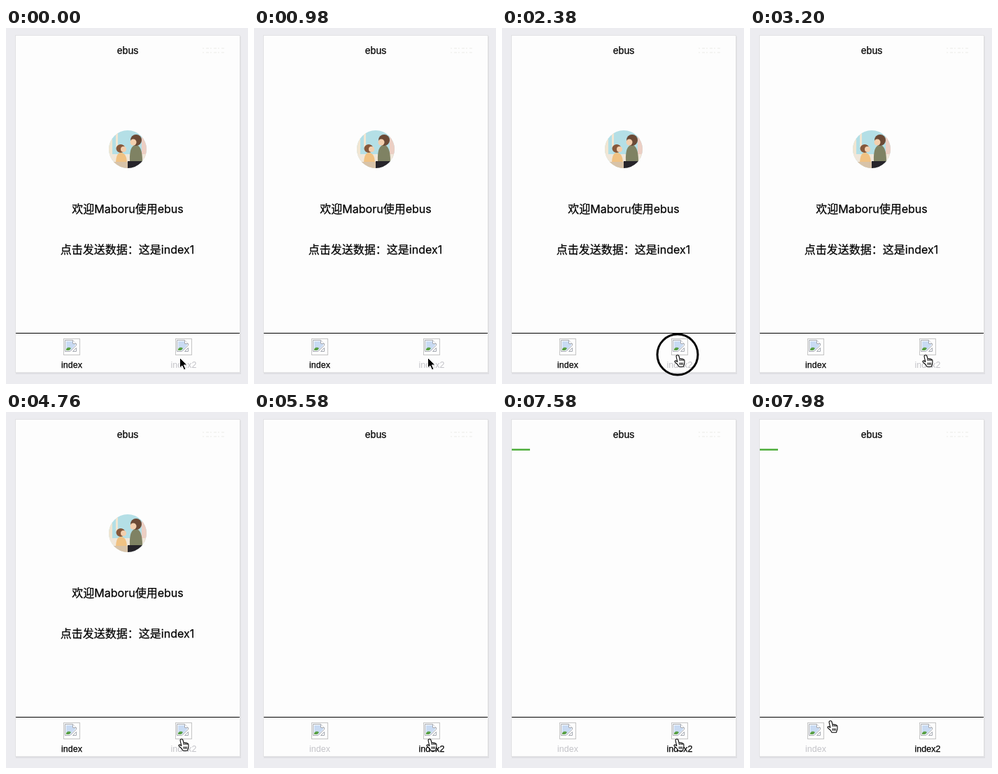
An HTML page for the animation above (8 s loop, 346 px wide and 508 px high).

```html
<!DOCTYPE html>
<html lang="zh-CN">
<head>
<meta charset="utf-8">
<title>ebus</title>
<style>
  html, body { margin: 0; width: 100%; height: 100%; overflow: hidden; background: #ececf0; }
  svg { display: block; width: 100%; height: 100%; }
  text { text-anchor: middle; }
  .ui { font: 14px "Liberation Sans", Arial, sans-serif; }
  .tab { font-size: 12.5px; }
  .msg { font: 16px Inter, "Noto Sans CJK SC", "Noto Sans CJK", sans-serif; }
  .dark { fill: #000; stroke: #000; stroke-width: .25px; }
  .pale { fill: #c3c3c8; }
</style>
</head>
<body>
<svg viewBox="0 0 346 508">
  <defs>
    <clipPath id="round"><circle cx="174" cy="173" r="27"/></clipPath>
    <g id="broken">
      <rect x=".5" y=".5" width="23" height="23" fill="#fdfdfd" stroke="#c4c4c4"/>
      <path d="M2.500 18.500V2.500H13.500L18.500 7.500V10L9.500 18.500Z" fill="#fff" stroke="#a4a8b0"/>
      <path d="M4 4H13V8H17V10L10 17H4Z" fill="#c9dbf3"/>
      <path d="M4 17V15Q7 11 11 14L8.500 17Z" fill="#5aa046"/>
      <path d="M13.500 2.500V7.500H18.500" fill="#fff" stroke="#a4a8b0"/>
      <path d="M18.500 13.500V18.500H13.500Z" fill="#fff" stroke="#a4a8b0"/>
    </g>
  </defs>

  <rect x="14" y="12" width="322" height="482" fill="#dfdfe3"/>
  <rect x="13.500" y="10.500" width="321" height="481" fill="#fdfdfd" stroke="#e2e2e4"/>

  <text class="ui dark" x="174" y="37">ebus</text>
  <path d="M281 29H314M281 35H314" stroke="#f4f4f2" stroke-width="2" stroke-dasharray="2 3 4 2"/>

  <g id="home">
    <g clip-path="url(#round)">
      <rect x="147" y="146" width="54" height="54" fill="#b4dfe6"/>
      <path d="M147 146H152V186H147ZM157 146H160V170H157Z" fill="#f1e6d2"/>
      <path d="M194 146H201V186H194Z" fill="#eccfc4"/>
      <path d="M147 180H201V200H147Z" fill="#f0e7da"/>
      <path d="M157 194Q157 177 165 178Q173 179 173 194Z" fill="#f0c283"/>
      <ellipse cx="164" cy="172" rx="6.500" ry="6" fill="#87583a"/>
      <circle cx="168" cy="173" r="4" fill="#f3cfae"/>
      <path d="M177 190Q176 167 186 167Q195 168 195 190Z" fill="#7f8263"/>
      <circle cx="186" cy="160" r="8" fill="#6b4a36"/>
      <circle cx="182" cy="163" r="4.500" fill="#f3cfae"/>
      <path d="M147 191H174V200H147Z" fill="#d8c3a8"/>
      <path d="M174 190H201V200H174Z" fill="#26242a"/>
    </g>
    <text class="msg dark" x="174" y="263.500">欢迎Maboru使用ebus</text>
    <text class="msg dark" x="173.500" y="321.500">点击发送数据：这是index1</text>
  </g>

  <rect id="bar" x="14" y="52.500" height="2.500" fill="#4fae3c"/>

  <rect x="14" y="435" width="320" height="1" fill="#000"/>
  <use href="#broken" x="82" y="443"/>
  <use href="#broken" x="242" y="443"/>
  <text id="tab1" class="ui tab" x="94" y="485">index</text>
  <text id="tab2" class="ui tab" x="254" y="485">index2</text>

  <circle id="ring" cx="251" cy="466" r="29" fill="none" stroke="#000" stroke-width="3"/>
  <path id="arrow" transform="translate(248 470)" d="M.5 .5V15L3.800 11.900L6.500 17.800L9 16.700L6.400 10.900H11Z"
    fill="#000" stroke="#fff" stroke-width="1"/>
  <g id="hand" stroke="#000" stroke-width="1.100" stroke-linejoin="round">
    <path fill="#fff" d="M3.900 .9C5 .4 6.400 .8 6.900 2L8.100 6.200C8.900 5.400 10.200 5.600 10.600 6.400C11.300 5.800 12.500 6 12.900 7C13.900 6.600 14.900 7.200 14.900 8.400V12L13.500 17.200H7L5 14L1.100 10.600C.6 9.600 1.600 8.500 2.800 9L4.800 10.400L3.100 3C2.900 2 3.100 1.300 3.900 .9Z"/>
    <path fill="none" d="M8.100 6.200L8.700 9M10.600 6.600L11 9M12.900 7.200L13 9M8.300 11.500V14.800M10.300 11.500V14.800M12.200 11.500V14.800"/>
  </g>
</svg>
<script>
  const LOOP = 8000, SWITCH = 5580, HOVER = 1200;
  const $ = id => document.getElementById(id);
  const show = (id, on) => $(id).setAttribute("visibility", on ? "visible" : "hidden");
  const label = (id, active) => $(id).setAttribute("class", "ui tab " + (active ? "dark" : "pale"));

  // [time, width]: the loading bar jumps, then fills and restarts
  const bar = [[0, 0], [5880, 58], [6420, 114], [6700, 172], [6960, 230], [7060, 286], [7120, 320], [7220, 0], [7280, 26]];
  const stepAt = (list, t) => list.filter(s => s[0] <= t).pop()[1];
  const ease = p => p * p * (3 - 2 * p);
  const part = (t, from, to) => Math.min(1, Math.max(0, (t - from) / (to - from)));

  function draw(t) {
    const second = t >= SWITCH;
    show("home", !second);
    label("tab1", !second);
    label("tab2", second);

    $("bar").setAttribute("width", stepAt(bar, t));

    show("arrow", t < HOVER);
    show("hand", t >= HOVER);
    show("ring", t >= 2280 && t < 2440);

    const p = ease(part(t, 7560, 7980));
    const x = Math.round(246 - 136 * p), y = Math.round(466 - 26 * p);
    $("hand").setAttribute("transform", `translate(${x} ${y})`);
  }

  function tick() {
    draw(performance.now() % LOOP);
    requestAnimationFrame(tick);
  }
  tick();
</script>
</body>
</html>
```
